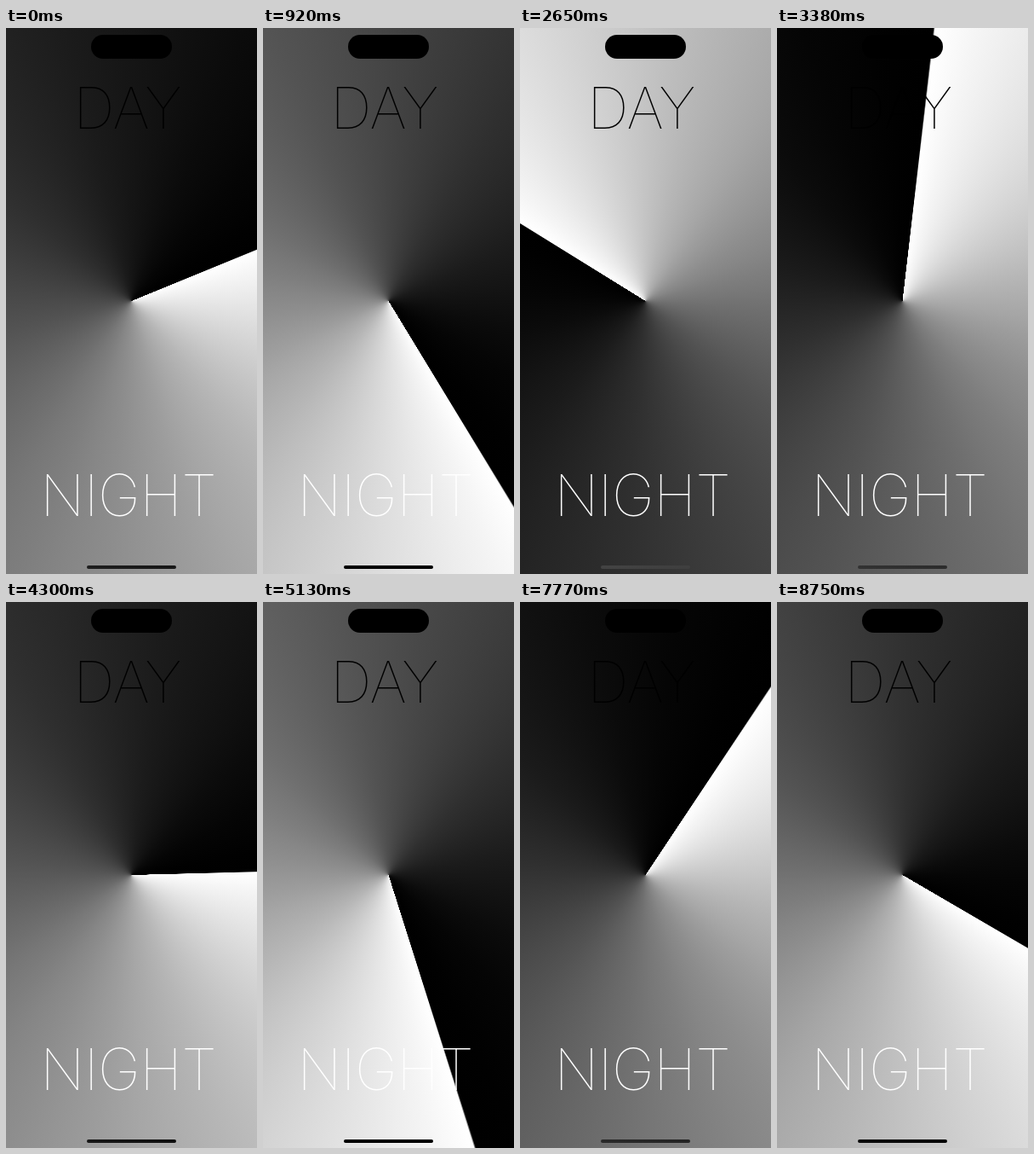
Write an HTML page that moves like this. It is 295x640 px and loops after 8.84 s.

```html
<!DOCTYPE html>
<html lang="en">
<head>
<meta charset="utf-8">
<title>Day / Night</title>
<style>
  html, body { margin: 0; width: 100%; height: 100%; overflow: hidden; background: #000; }
  #stage { position: relative; width: 295px; height: 640px; overflow: hidden; }
  #stage > * { position: absolute; }
  #island { left: 100px; top: 8px; width: 95px; height: 28px; border-radius: 14px; background: #000; }
  #home { left: 95px; top: 630px; width: 105px; height: 4px; border-radius: 2px; }
  svg { left: 0; top: 0; }
  text { font: 130 67.5px Inter, sans-serif; letter-spacing: -.6px; }
</style>
</head>
<body>
<div id="stage">
  <div id="island"></div>
  <svg width="295" height="640">
    <text y="117.5" fill="#000">DAY</text>
    <text y="571.5" fill="#fff">NIGHT</text>
  </svg>
  <div id="home"></div>
</div>
<script>
const LOOP = 8840;
const CENTER = { x: 147.5, y: 320 };
const stage = document.getElementById('stage');
const home = document.getElementById('home');

// Seam angle in degrees clockwise from the top, over time in ms
const turn = [[0, 67.5], [1690, 216], [5130, 522.1], [6420, 634.3], [8750, 840]];

function angleAt(ms) {
  const time = Math.min(ms, 8750);
  const next = Math.max(1, turn.findIndex(([t]) => t >= time));
  const [t0, a0] = turn[next - 1];
  const [t1, a1] = turn[next];
  return a0 + (a1 - a0) * (time - t0) / (t1 - t0);
}

// Light fades around the dial from white to black
const light = part => 255 * (1 - part) ** 1.5;

function shades(tone) {
  const count = 40;
  const grey = (level, percent) => `rgb(${level} ${level} ${level}) ${percent}%`;
  const stops = [grey(Math.round(tone(0)), 0)];
  for (let i = 0; i <= count; i++) {
    // The first stop sits just past zero so the seam is softly edged
    const percent = Math.max(.1, 100 * i / count);
    stops.push(grey(Math.round(tone(light(i / count))), percent));
  }
  return stops.join(',');
}

const skyShades = shades(level => level);
const homeShades = shades(level => Math.max(0, 85 - level * .4));

const sweep = (angle, x, y, stops) =>
  `conic-gradient(from ${angle}deg at ${x}px ${y}px, ${stops})`;

// Centre each word on its visible ink
const pen = document.createElement('canvas').getContext('2d');
for (const word of document.querySelectorAll('text')) {
  const style = getComputedStyle(word);
  pen.font = `${style.fontWeight} ${style.fontSize} ${style.fontFamily}`;
  pen.letterSpacing = style.letterSpacing;
  const ink = pen.measureText(word.textContent);
  const shift = (ink.actualBoundingBoxRight - ink.actualBoundingBoxLeft) / 2;
  word.setAttribute('x', CENTER.x - 1.8 - shift);
}

function draw(ms) {
  const angle = angleAt(ms);
  stage.style.background = sweep(angle, CENTER.x, CENTER.y, skyShades);
  home.style.background =
    sweep(angle, CENTER.x - home.offsetLeft, CENTER.y - home.offsetTop, homeShades);
}

const start = performance.now();
function loop() {
  draw((performance.now() - start) % LOOP);
  requestAnimationFrame(loop);
}
loop();
</script>
</body>
</html>
```
